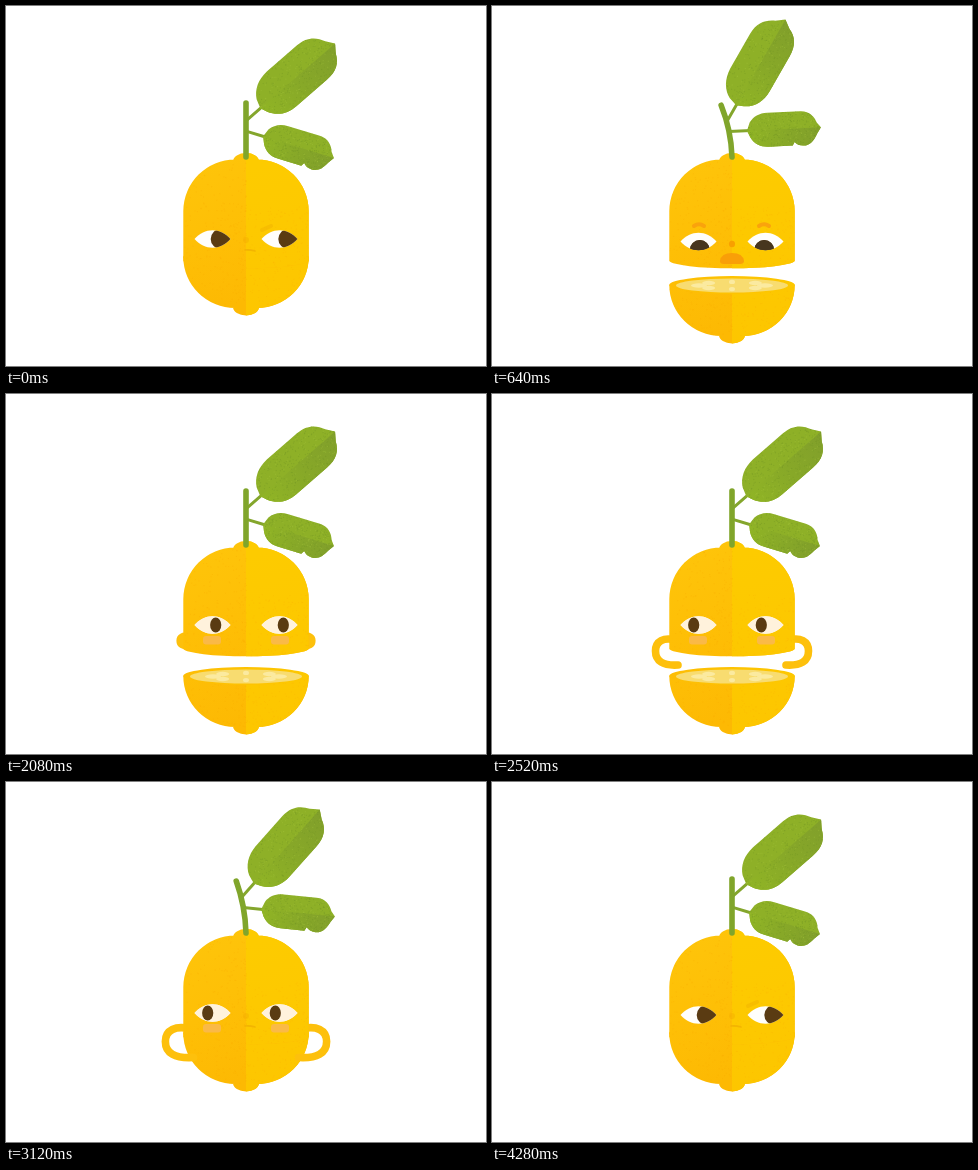
An HTML page with a canvas that plays this animation: 480x360 px, repeating every 4.32 s.

```html
<!DOCTYPE html>
<html lang="en">
<head>
<meta charset="utf-8">
<title>Lemon</title>
<style>
  html, body { margin: 0; width: 100%; height: 100%; overflow: hidden; background: #fff; }
  canvas { display: block; width: 480px; height: 360px; }
</style>
</head>
<body>
<canvas id="stage" width="480" height="360"></canvas>
<script>
const ctx = document.getElementById('stage').getContext('2d');
const LOOP = 4320, STEP = 40, BOIL = 160;
const CUT = 280, SHUT = 2680;

// Timing helpers: smooth rise, rise and fall, single hump, damped spring.
const ease = (t, from, span) => {
  const k = Math.min(1, Math.max(0, (t - from) / span));
  return k * k * (3 - 2 * k);
};
const hold = (t, on, off, rise, fall = rise) => ease(t, on, rise) - ease(t, off, fall);
const bump = (t, from, to) => t > from && t < to ? Math.sin(Math.PI * (t - from) / (to - from)) ** 2 : 0;
const spring = time => time < 0 ? 0 : -110 * Math.sin(time * Math.PI / 130) * Math.exp(-time / 130);
const swing = t => spring(t - CUT) + spring(t - SHUT);

function poseAt(t) {
  const lean = hold(t, CUT, 1400, 120, 440) + hold(t, SHUT, 3040, 120, 240);
  const shock = hold(t, CUT, 1440, 120, 200);
  const calm = hold(t, 1560, 3120, 200);
  const scowl = hold(t, 3260, 3500, 140, 120);
  const sly = 1 - hold(t, CUT, 3480, 120);
  return {
    shock, calm, scowl,
    bend: lean + swing(t) / 48,
    leafA: -41 - 14.6 * lean + swing(t),
    leafB: 17 - 16 * lean + .4 * swing(t - 40),
    drop: 31 * hold(t, 300, 2560, 140, 160) - 3 * bump(t, 540, 740),
    ear: hold(t, 1960, 3120, 300, 200) + 1.6 * bump(t, 2080, 2480) + .5 * bump(t, 3080, 3240),
    lid: 8.7 - 6.2 * scowl,
    eyeY: 233 + 2.5 * shock - 2 * calm,
    look: 8.5 * sly + 3.5 * scowl + calm * (3.5 - 8 * ease(t, 2320, 120))
  };
}

function seeded(seed) {
  let s = seed * 7919 + 17;
  return () => (s = (s * 16807) % 2147483647) / 2147483647;
}

function gradient(x0, y0, x1, y1, ...colors) {
  const g = ctx.createLinearGradient(x0, y0, x1, y1);
  colors.forEach((c, i) => g.addColorStop(i / (colors.length - 1), c));
  return g;
}

function fill(path, color, alpha = 1) {
  ctx.globalAlpha = alpha;
  ctx.fillStyle = color;
  ctx.fill(path);
  ctx.globalAlpha = 1;
}

function stroke(d, color, width, alpha = 1) {
  ctx.globalAlpha = alpha;
  ctx.strokeStyle = color;
  ctx.lineWidth = width;
  ctx.lineCap = 'round';
  ctx.stroke(new Path2D(d));
  ctx.globalAlpha = 1;
}

function oval(x, y, rx, ry) {
  const p = new Path2D();
  p.ellipse(x, y, rx, ry, 0, 0, Math.PI * 2);
  return p;
}

function clipped(path, draw) {
  ctx.save();
  ctx.clip(path);
  draw();
  ctx.restore();
}

// Scatter of grain; skew above 1 gathers it towards x0.
function grain(seed, count, color, x0, y0, w, h, skew = 1) {
  const rnd = seeded(seed);
  ctx.fillStyle = color;
  for (let i = 0; i < count; i++) {
    ctx.fillRect(x0 + w * rnd() ** skew, y0 + h * rnd(), 1, 1);
  }
}

const head = new Path2D('M177.3 255V205A52 52 0 0 1 229 153.4H251A52 52 0 0 1 302.7 205V255A63 8 0 0 1 177.3 255Z');
head.addPath(oval(240, 155.5, 13, 8.5));
const bowl = new Path2D('M177.3 251A63 9 0 0 1 302.7 251A52 51 0 0 1 251 302H229A52 51 0 0 1 177.3 251Z');
bowl.addPath(oval(240, 301, 13, 8.5));
const leafA = new Path2D('M19 0L22 -9C27 -18 36 -23 48 -23.5H88C101 -23.5 108 -17 112 -8L118 0L112 8C108 17 101 22 88 22H48C36 22 27 17 22 7Z');
const leafB = new Path2D('M18 0L21 -8C25 -14 31 -17 39 -17H72C81 -17 86 -11 88 -5L92 0L88 6C84 14 80 17.5 74 17.5C70 17.5 67 16 65 13.5L63 17H39C31 17 25 14 21 7Z');

function peel(path, seed) {
  fill(path, gradient(185, 165, 240, 295, '#fec40a', '#febf06', '#fdb903'));
  clipped(path, () => {
    ctx.fillStyle = gradient(250, 160, 290, 300, '#fdcb00', '#fdc600');
    ctx.fillRect(240, 130, 80, 200);
    grain(seed, 260, 'rgba(247,170,0,.3)', 240, 155, -63, 147, 1.6);
    grain(seed + 50, 240, 'rgba(250,175,0,.28)', 302, 200, -62, 102, 1.3);
  });
}

function drawLeaf(shape, x, y, angle, length, width, seed) {
  ctx.save();
  ctx.translate(x, y);
  ctx.rotate(angle * Math.PI / 180);
  stroke('M0 0H22', '#84a62c', 3);
  fill(shape, '#8eb027');
  clipped(shape, () => {
    ctx.fillStyle = gradient(20, 0, length, 0, '#90b425', '#87a828', '#819f2b');
    ctx.fillRect(0, 0, length, width);
    grain(seed, 420, 'rgba(110,145,35,.4)', length, -width, -length, width * 2, 1.3);
    grain(seed + 9, 180, 'rgba(165,195,60,.4)', 10, -width, length, width * 2);
  });
  ctx.restore();
}

function drawPlant(pose, seed) {
  const { bend } = pose;
  const tipX = 240 - 12 * bend, tipY = 97 + 2.5 * bend, bow = 240 - bend;
  const curve = (k, a, b, c) => (1 - k) ** 2 * a + 2 * k * (1 - k) * b + k * k * c;
  const along = k => [curve(k, 240, bow, tipX), curve(k, 151, 124, tipY)];
  drawLeaf(leafB, ...along(.48), pose.leafB, 92, 20, seed + 3);
  drawLeaf(leafA, ...along(.67), pose.leafA, 118, 26, seed + 5);
  stroke(`M240 151Q${bow} 124 ${tipX} ${tipY}`, '#80a52b', 5.6);
}

function drawEars({ ear }) {
  if (ear <= .02) return;
  const tall = Math.min(ear, 1.15);
  for (const side of [-1, 1]) {
    const at = (x, y) => `${240 + side * (60 + x * ear)} ${241 + y * tall}`;
    stroke(`M${at(-3, 5)}C${at(8, 2)} ${at(16.5, 6)} ${at(16.5, 16)}C${at(16.5, 26)} ${at(9, 31)} ${at(-6, 30)}`, '#fdc00c', 7.6);
  }
}

function drawBowl({ drop }, seed) {
  ctx.save();
  ctx.translate(0, drop);
  peel(bowl, seed);
  fill(oval(240, 251, 62.7, 9), gradient(177, 0, 303, 0, '#fdbd05', '#fdc800'));
  fill(oval(240, 251.5, 56, 7), '#f8dc70');
  for (let i = 0; i < 8; i++) {
    const a = i * Math.PI / 4, far = Math.abs(Math.cos(a));
    fill(oval(240 + 33 * Math.cos(a), 251.5 + 3.6 * Math.sin(a), 3 + 5 * far, 2.2), '#fbeaa0');
  }
  ctx.restore();
}

function drawEye(cx, side, { lid, eyeY, look, shock, calm, scowl }) {
  const w = 18, c = 8 + 3 * scowl, h = lid * 4 / 3;
  const shape = new Path2D(`M${cx - w} ${eyeY}C${cx - c} ${eyeY - h} ${cx + c} ${eyeY - h} ${cx + w} ${eyeY}`
    + `C${cx + c} ${eyeY + h} ${cx - c} ${eyeY + h} ${cx - w} ${eyeY}Z`);
  fill(shape, '#fffefb');
  fill(shape, '#fff2dc', calm);
  clipped(shape, () => {
    const x = cx + look + side * (.3 - 1.6 * shock);
    const iris = oval(x, eyeY + 8.5 * shock, 10 + 2 * scowl - 4.4 * calm, 10 - 2.5 * calm);
    fill(iris, '#5a3b12');
    fill(iris, '#47361e', Math.max(shock, scowl));
  });
}

function drawFace(pose) {
  const { shock, calm, scowl, drop } = pose;
  const quiet = (1 - shock) * Math.max(0, 1 - drop / 28);
  drawEye(206.5, -1, pose);
  drawEye(273.5, 1, pose);

  for (const x of [197, 265]) {
    const cheek = new Path2D();
    cheek.roundRect(x, 242, 18, 8.5, 3);
    fill(cheek, '#fab84f', calm * .9);
  }
  for (const x of [207, 272]) {
    stroke(`M${x - 5} 220Q${x} 216.5 ${x + 5} 220`, '#faa30c', 4, shock);
  }
  fill(oval(240, 238, 3, 3.2), '#f8a000', shock);
  fill(new Path2D('M228 255Q229 247 240 247Q251 247 252 255Q252 258 248 258H232Q228 258 228 255Z'), '#f99f08', shock);

  fill(oval(240, 234, 3, 3), '#f2aa00', .4 * quiet);
  stroke('M239 244Q244 243.5 249 245', '#eead00', 1.6, .7 * quiet * (1 - scowl));
  stroke('M230 247.5Q234 243 242 244.5Q248 245 250 248', '#eaaa00', 2, .8 * scowl);
  stroke('M256 224L265 220', '#f2b400', 4, .5 * quiet * (1 - calm) * (1 - scowl));
  stroke('M215 221L226 223', '#f0ad00', 3, .4 * scowl);
  stroke('M256 223L266 222', '#efb000', 4, .7 * scowl);
}

function draw(t) {
  const pose = poseAt(t);
  const seed = 1 + Math.floor((t + 40) / BOIL) % 27;
  ctx.fillStyle = '#fff';
  ctx.fillRect(0, 0, 480, 360);
  drawBowl(pose, seed);
  drawEars(pose);
  peel(head, seed + 100);
  drawPlant(pose, seed);
  drawFace(pose);
}

const start = performance.now();
let shown = -1;
function tick() {
  const t = Math.floor(((performance.now() - start) % LOOP) / STEP) * STEP;
  if (t !== shown) draw(shown = t);
  requestAnimationFrame(tick);
}
tick();
</script>
</body>
</html>
```
